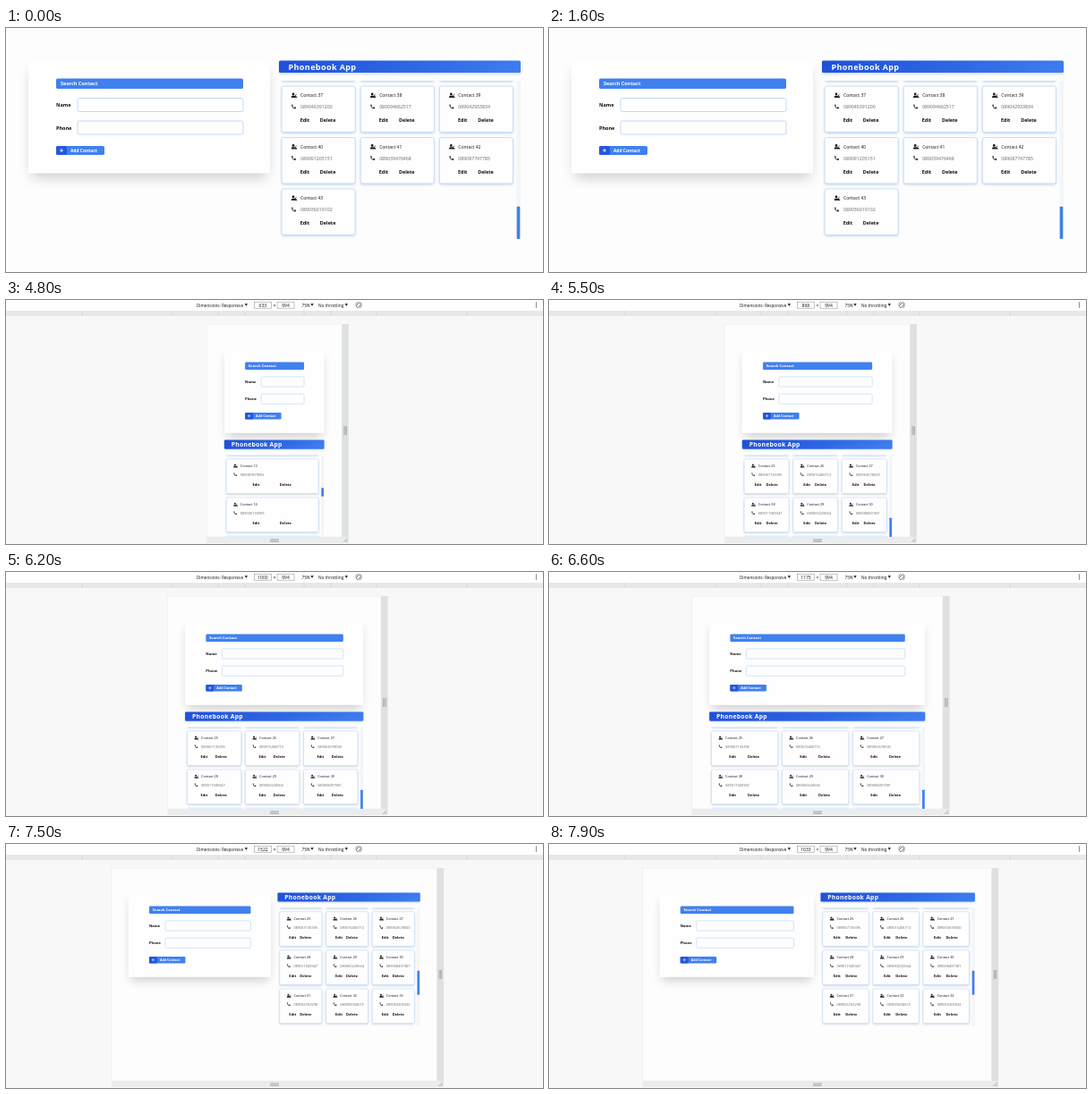
Animation, 600 px wide and 273 px high, one loop 8000 ms. Source, as an HTML page:

```html
<!DOCTYPE html>
<html lang="en">
<head>
<meta charset="utf-8">
<title>Phonebook App</title>
<style>
  html, body { margin: 0; width: 100%; height: 100%; overflow: hidden; background: #fdfdfd; }
  svg { display: block; width: 100%; height: 100%; font-family: "Noto Sans", "Open Sans", sans-serif; }
  .b { font-weight: 700; }
</style>
</head>
<body>
<svg viewBox="0 0 600 273" preserveAspectRatio="none">
  <defs>
    <linearGradient id="head" x1="0" y1="0" x2="1" y2=".05">
      <stop offset="0" stop-color="#1f50d8"/><stop offset=".6" stop-color="#2f68e4"/><stop offset="1" stop-color="#3d7cee"/>
    </linearGradient>
    <filter id="soft" x="-30%" y="-40%" width="160%" height="180%"><feGaussianBlur stdDeviation="7.5"/></filter>
    <filter id="near" x="-10%" y="-50%" width="120%" height="200%"><feGaussianBlur stdDeviation="1.4"/></filter>
    <g id="user">
      <circle cx="-1" cy="-1.3" r="1.4"/>
      <path d="M-3.2 2.6V1.7Q-3.2.5-1.8.5H.2Q2.2.7 3.2 1.7V2.6Z"/>
      <path d="M.6 1 2.6-.9" stroke="#222" stroke-width=".9"/>
    </g>
    <path id="phone" d="M-2.6-2.2-1.3-2.6-.6-1-1.3-.4Q-.8.8.4 1.3L1 0 2.7.8 2.3 2.2Q1.8 2.7.8 2.5-2.4 1.5-2.6-2.2Z"/>
    <clipPath id="view"><rect id="viewBox"/></clipPath>
    <clipPath id="list"><rect id="listBox"/></clipPath>
  </defs>
  <g id="tools"></g>
  <g clip-path="url(#view)"><g id="page"></g></g>
</svg>
<script>
const LOOP = 8000, STEP = 100, TOTAL = 43;
const CSS_PX = 0.3184, ZOOM = 0.75, CENTER = 299.7, PAGE_TOP = 27, PAGE_BOTTOM = 265;
const widths = [
  [1800, 511], [2600, 511], [2900, 585], [4700, 585], [4800, 633], [5500, 868],
  [5900, 868], [6600, 1175], [6800, 1265], [7100, 1385], [7700, 1591], [7900, 1633]
];
const $ = id => document.getElementById(id);

const rect = (x, y, w, h, fill, more = '') =>
  `<rect x="${x}" y="${y}" width="${w}" height="${h}" fill="${fill}" ${more}/>`;
const text = (x, y, size, str, fill = '#222', more = '') =>
  `<text x="${x}" y="${y}" font-size="${size}" fill="${fill}" ${more}>${str}</text>`;
const bold = (x, y, size, str, fill = '#0c0c0c', more = '') => text(x, y, size, str, fill, 'class="b" ' + more);
const icon = (id, x, y, fill) => `<use href="#${id}" x="${x}" y="${y}" fill="${fill}"/>`;
const line = (d, color, w = 0.6) => `<path d="${d}" fill="none" stroke="${color}" stroke-width="${w}"/>`;

function setBox(id, x, y, w, h) {
  Object.entries({ x, y, width: w, height: h }).forEach(([k, v]) => $(id).setAttribute(k, v));
}

function widthAt(t) {
  for (let i = 1; i < widths.length; i++) {
    const [t0, w0] = widths[i - 1], [t1, w1] = widths[i];
    if (t <= t1) return w0 + (w1 - w0) * (t - t0) / (t1 - t0);
  }
  return widths[widths.length - 1][1];
}

// made-up number for each contact
const number = n => '0890' + String((n * 48271317 + 60352471) % 1e8).padStart(8, '0');

function form(x, w) {
  const l = x + 31, bw = w - 61;
  const field = (label, y) =>
    bold(l, y + 9.5, 5.5, label) +
    rect(l + 24, y, bw - 24, 15, '#fefefe', 'rx="2" stroke="#b4d2fa" stroke-width=".8"');
  return rect(x + 4, 48, w - 8, 119, '#000', 'opacity=".2" filter="url(#soft)"') +
    rect(x, 36, w, 126.5, '#fefefe') +
    rect(l, 56.5, bw, 11.5, '#4080ef', 'rx="1.8"') +
    bold(l + 5, 64.3, 5.5, 'Search Contact', '#fff') +
    field('Name', 78.5) + field('Phone', 104) +
    rect(l, 132, 54, 10, '#4080ef', 'rx="1.8"') +
    rect(l, 132, 12, 10, '#2458dc', 'rx="1.8"') +
    line(`M${l + 4} 137h4m-2-2v4`, '#fff', 0.8) +
    bold(l + 16, 138.9, 4.9, 'Add Contact', '#fff');
}

function card(x, y, w, n, wrap) {
  const drop = wrap ? 7.5 : 0, h = 51.5 + drop;
  const gap = Math.max(1, (w - 48) / 3), edit = x + w / 2 - (29.5 + gap) / 2;
  const name = wrap
    ? text(x + 21, y + 11, 5, 'Contact') + text(x + 21, y + 19.3, 5, n)
    : text(x + 21, y + 12, 5, 'Contact ' + n);
  return rect(x, y + 1.6, w, h, '#7f9cc4', 'rx="2" opacity=".42" filter="url(#near)"') +
    rect(x, y, w, h, '#fefefe', 'rx="2" stroke="#bcd7fa" stroke-width=".8"') +
    icon('user', x + 14, y + 10.3 + drop / 2, '#222') + name +
    icon('phone', x + 13.5, y + 23 + drop, '#444') +
    text(x + 21, y + 25 + drop, 5.2, number(n), '#707070') +
    bold(edit, y + 40.2 + drop, 5.4, 'Edit') +
    bold(edit + 10.8 + gap, y + 40.2 + drop, 5.4, 'Delete');
}

function contacts(x, y, w, cols, start) {
  const top = y + 22.5, view = 177, colW = (w - 5.5) / cols, cw = colW - 6;
  const wrap = cw < 62, pitch = wrap ? 65 : 57.5;
  const full = Math.ceil(TOTAL / cols) * pitch + 5;
  const thumbY = top + view * ((start - 1) / cols) * pitch / full;
  let cards = '';
  for (let i = -cols; i < cols * 4 && start + i <= TOTAL; i++) {
    const row = Math.floor(i / cols), col = i - row * cols;
    cards += card(x + 3 + col * colW, y + 28.5 + row * pitch, cw, start + i, wrap);
  }
  setBox('listBox', x, top, w, view);
  return rect(x, y + 1.5, w, 13.5, '#2a4f9c', 'opacity=".2" filter="url(#near)"') +
    rect(x, y, w, 13.5, 'url(#head)', 'rx="1.5"') +
    bold(x + 10.5, y + 10.4, 9, 'Phonebook App', '#fff', 'letter-spacing=".4"') +
    `<g clip-path="url(#list)">${cards}` +
    rect(x + w - 4.8, top, 4.8, view, '#f4f5f6') +
    rect(x + w - 4.3, thumbY, 3.6, view * view / full, '#4080ea', 'rx=".6"') + '</g>';
}

function layout(css, start) {
  const W = css * CSS_PX;
  if (css >= 1280) {
    const w = (W - 60) / 2;
    return form(25, w) + contacts(35 + w, 36.5, w, 3, start);
  }
  const cols = css < 640 ? 1 : css < 768 ? 2 : 3, x = 26.3, w = W - 2 * x;
  return form(x, w) + contacts(x, 172.7, w, cols, cols === 1 ? 13 : start);
}

function toolbar(css, left, right) {
  const arrow = x => `<path d="M${x} 4h3.4l-1.7 3z" fill="#333"/>`;
  const box = (x, n) => rect(x, 2.2, 19, 7, '#fff', 'stroke="#999" stroke-width=".6"') +
    text(x + 9.5, 7.6, 5, n, '#222', 'text-anchor="middle"');
  const ticks = [33, 63, 114, 215].map(d => line(`M${300 - d} 12v6M${300 + d} 12v6`, '#d2d5d4', 0.7)).join('');
  const dots = [3.3, 5.5, 7.7].map(y => `<circle cx="592.5" cy="${y}" r=".7" fill="#444"/>`).join('');
  return rect(0, 0, 600, 273, '#f7f8f7') + rect(0, 0, 600, 12, '#fefefe') +
    rect(0, 12, 600, 6, '#e6e9e8') + ticks +
    text(213, 7.5, 4.6, 'Dimensions: Responsive') + arrow(266.6) +
    box(277.4, Math.round(css)) + text(298.4, 7.5, 5, '×') + box(303, 994) +
    text(330.5, 7.5, 4.6, '75%') + arrow(340.3) +
    text(349, 7.5, 4.7, 'No throttling') + arrow(378.6) +
    `<rect x="392.6" y="2.6" width="3" height="6" rx=".6" fill="none" stroke="#444" stroke-width=".8" transform="rotate(45 394.1 5.6)"/>` +
    line('M390.8 5.4a3.6 3.6 0 0 1 2.6-3.2M397.4 5.8a3.6 3.6 0 0 1-2.6 3.2', '#444') + dots +
    rect(left, PAGE_TOP, right - left, PAGE_BOTTOM - PAGE_TOP, '#fdfdfd', 'stroke="#e5e7e6" stroke-width=".5"') +
    rect(right, PAGE_TOP, 7.6, 238, '#dee1e0') +
    rect(left, PAGE_BOTTOM, right - left + 7.6, 7.2, '#ebedec') +
    line(`M${right + 2.6} 141v10m1.3-10v10m1.3-10v10`, '#8d9194') +
    line('M295 267.8h10m-10 1.3h10m-10 1.3h10', '#8d9194') +
    line(`M${right + 2} 271l4.5-4.5m-2 4.5 2-2`, '#777');
}

function draw(t) {
  if (t < 1800) {
    $('tools').innerHTML = '';
    setBox('viewBox', 0, 0, 600, 273);
    $('page').setAttribute('transform', 'scale(1)');
    $('page').innerHTML = layout(600 / CSS_PX, 37);
    return;
  }
  const css = widthAt(t), half = css * CSS_PX * ZOOM / 2, left = CENTER - half;
  $('tools').innerHTML = toolbar(css, left, CENTER + half);
  setBox('viewBox', left, PAGE_TOP, half * 2, PAGE_BOTTOM - PAGE_TOP);
  $('page').setAttribute('transform', `translate(${left} ${PAGE_TOP}) scale(${ZOOM})`);
  $('page').innerHTML = layout(css, 25);
}

const began = performance.now();
let last = -1;
function tick() {
  const t = Math.floor((performance.now() - began) % LOOP / STEP) * STEP;
  if (t !== last) draw(last = t);
  requestAnimationFrame(tick);
}
tick();
</script>
</body>
</html>
```
